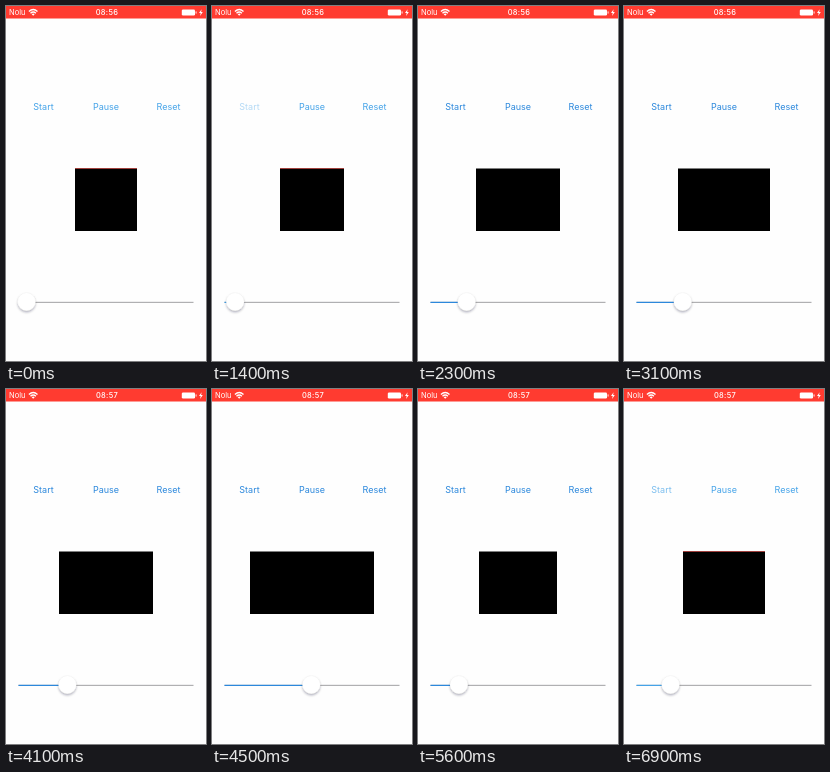
An HTML page for the animation above (7000 ms loop, 200 by 355 pixels).

```html
<!DOCTYPE html>
<html lang="en">
<head>
<meta charset="utf-8">
<title>Slider scrub</title>
<style>
  html, body { margin: 0; width: 100%; height: 100%; overflow: hidden; background: #fefefe; }
  svg { display: block; width: 100vw; height: 100vh; }
  text { font-family: Inter, Roboto, sans-serif; }
  .bar { fill: #fff; font-size: 7.5px; }
  .btn { font-size: 9px; text-anchor: middle; }
</style>
</head>
<body>
<svg viewBox="0 0 200 355">
  <defs>
    <filter id="shade" x="-50%" y="-50%" width="200%" height="200%">
      <feDropShadow dx="0" dy="1.6" stdDeviation="1.3" flood-color="#101030" flood-opacity=".3"/>
    </filter>
  </defs>
  <rect width="200" height="355" fill="#fefefe"/>

  <rect width="200" height="12.5" fill="#ff3b30"/>
  <text class="bar" x="3" y="9.3">Nolu</text>
  <g fill="none" stroke="#fff" stroke-width="1.4">
    <path d="M22.9 5.4Q27.2 1.6 31.5 5.4"/>
    <path d="M24.5 7.2Q27.2 4.8 29.9 7.2"/>
  </g>
  <path d="M25.7 8.2Q27.2 7 28.7 8.2L27.2 9.8Z" fill="#fff"/>
  <text class="bar" id="clock" x="101" y="9.3" text-anchor="middle" font-weight="500" letter-spacing=".3"></text>
  <rect x="175.8" y="3.5" width="13.2" height="6" rx="1.3" fill="#fff"/>
  <rect x="189.6" y="5.3" width=".9" height="2.4" rx=".4" fill="#fff"/>
  <path d="M195.6 3.2L193 7H194.7L194.1 10L196.8 6H195.1Z" fill="#fff"/>

  <g id="buttons">
    <text class="btn" id="start" x="37.5" y="103.7">Start</text>
    <text class="btn" id="pause" x="100" y="103.7">Pause</text>
    <text class="btn" x="162.5" y="103.7">Reset</text>
  </g>

  <rect id="box" y="162.5" height="62.5"/>
  <rect id="edge" y="162" height="1" fill="#a0403c"/>

  <rect x="12.5" y="295.8" width="175" height="1.2" fill="#b0b0b2"/>
  <rect id="fill" x="12.5" y="295.8" height="1.2"/>
  <circle id="thumb" cy="295.7" r="9" fill="#fff" stroke="#000" stroke-opacity=".1" stroke-width=".3" filter="url(#shade)"/>
</svg>
<script>
const LOOP = 7000, STEP = 100;
const RATE = 0.18 / 1000;
const PAUSED = 0.242, PEAK = 0.59, LOW = 0.129;
const $ = id => document.getElementById(id);
const set = (id, attrs) => {
  for (const k in attrs) $(id).setAttribute(k, attrs[k]);
};
const clamp = x => Math.min(1, Math.max(0, x));
const smooth = x => { x = clamp(x); return x * x * (3 - 2 * x); };
const glide = (a, b, t, from, to) => a + (b - a) * smooth((t - from) / (to - from));

// Linear playback, a pause, a drag out and back, then playback again
function progress(t) {
  if (t < 4000) return Math.min(PAUSED, Math.max(0, t - 1310) * RATE);
  if (t < 4750) return glide(PAUSED, PEAK, t, 4000, 4750);
  if (t < 6700) return glide(PEAK, LOW, t, 4750, 5450);
  return LOW + (t - 6700) * RATE;
}

// Opacity of a button tapped at the given time
const tap = (t, at) => t < at ? 1 : 0.4 + 0.6 * clamp((t - at) / 400);

function draw(t) {
  const v = progress(t);
  const soft = t < 2200 || t >= 6700;
  const tint = soft ? '#45a3e8' : '#2c88dc';
  const half = Math.floor(31.25 + 62.5 * v);
  const span = { x: 100 - half, width: 2 * half };
  const knob = 20.6 + 157.5 * v;
  set('box', span);
  set('edge', { ...span, opacity: soft ? 1 : 0 });
  set('fill', { width: knob - 12.5, fill: tint });
  set('thumb', { cx: knob });
  set('buttons', { fill: tint });
  set('start', { opacity: Math.min(tap(t % 6700, 1400), tap(t, 6700)) });
  set('pause', { opacity: tap(t, 2700) });
  $('clock').textContent = t < 4100 ? '08:56' : '08:57';
}

const t0 = performance.now();
function tick() {
  const t = (performance.now() - t0) % LOOP;
  draw(Math.floor(t / STEP) * STEP);
  requestAnimationFrame(tick);
}
tick();
</script>
</body>
</html>
```
